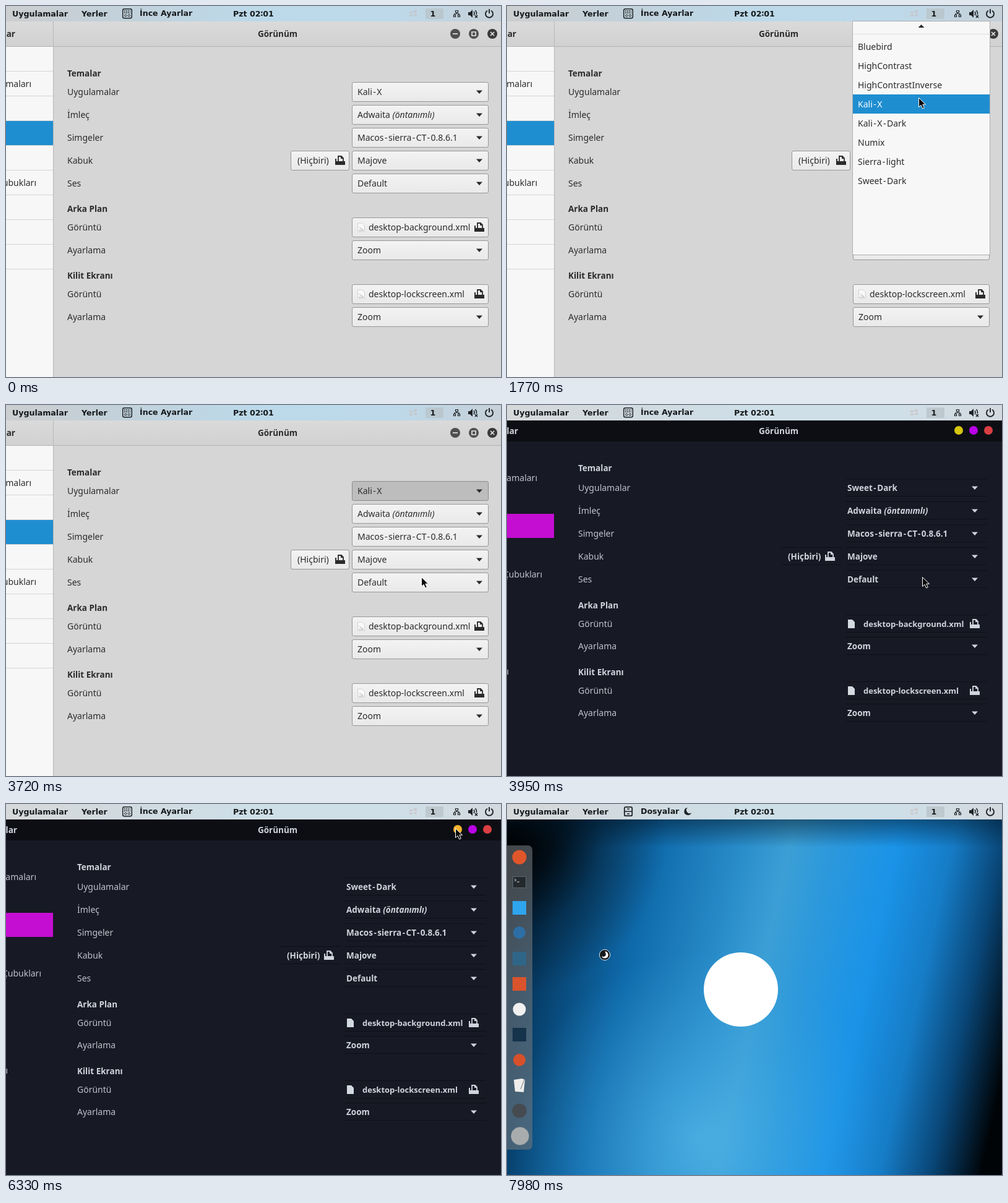
Recreate the animation shown at these times as an HTML page. Size 800 by 600 pixels, loop 8000 ms.

```html
<!DOCTYPE html>
<html lang="tr">
<head>
<meta charset="utf-8">
<title>Görünüm</title>
<style>
  html, body { margin: 0; width: 100%; height: 100%; overflow: hidden; background: #d6d6d6; }
  svg { display: block; font: 14px "Noto Sans", "Open Sans", sans-serif; }
  .bold { font-size: 13.5px; font-weight: 700; }
  .semi { font-size: 13.5px; font-weight: 600; }
  .name { font-size: 13px; font-weight: 600; }
  .bar { font: 700 12.6px "DejaVu Sans", sans-serif; fill: #161a1c; }
  .end { text-anchor: end; }
  .mid { text-anchor: middle; }
  .light { fill: #2b2b2b; color: #2b2b2b; }
  .dark { fill: #c0c3cc; color: #d0d4dc; }
  .dark .bold, .dark .semi, .dark .name { fill: #d0d4dc; }
  .combo rect { fill: url(#button); stroke: #979797; }
  .combo.hover rect { fill: #f7f7f7; }
  .combo.pressed rect { fill: #bdbdbd; stroke: #8c8c8c; }
  .item.on rect { fill: #1f8ed0; }
  .item.on text { fill: #fff; }
</style>
</head>
<body>
<svg id="stage" width="800" height="600" viewBox="0 0 800 600">
  <defs>
    <linearGradient id="button" x2="0" y2="1"><stop stop-color="#f3f3f3"/><stop offset="1" stop-color="#e9e9e9"/></linearGradient>
    <linearGradient id="header" x2="0" y2="1"><stop stop-color="#dadada"/><stop offset="1" stop-color="#d1d1d1"/></linearGradient>
    <linearGradient id="panel">
      <stop stop-color="#cccecf"/><stop offset=".22" stop-color="#c2d1da"/><stop offset=".5" stop-color="#bcd9e9"/>
      <stop offset=".78" stop-color="#bdd9ea"/><stop offset="1" stop-color="#c6d0d8"/>
    </linearGradient>
    <linearGradient id="sky" gradientUnits="userSpaceOnUse" x2="865" y2="190">
      <stop offset=".03" stop-color="#031c33"/><stop offset=".14" stop-color="#07426f"/><stop offset=".28" stop-color="#0f6aab"/>
      <stop offset=".44" stop-color="#2a8ecb"/><stop offset=".52" stop-color="#3c9fd5"/><stop offset=".6" stop-color="#2b98dc"/>
      <stop offset=".71" stop-color="#1a93e8"/><stop offset=".81" stop-color="#167cc6"/><stop offset=".9" stop-color="#094677"/><stop offset=".99" stop-color="#000407"/>
    </linearGradient>
    <radialGradient id="corner" gradientUnits="userSpaceOnUse" cx="0" cy="50" r="260">
      <stop stop-color="#000"/><stop offset=".3" stop-color="#000" stop-opacity=".72"/>
      <stop offset=".6" stop-color="#000" stop-opacity=".28"/><stop offset="1" stop-color="#000" stop-opacity="0"/>
    </radialGradient>
    <linearGradient id="ceiling" x2="0" y2="1"><stop stop-color="#001525" stop-opacity=".5"/><stop offset="1" stop-color="#001525" stop-opacity="0"/></linearGradient>
    <radialGradient id="glow" gradientUnits="userSpaceOnUse" cx="310" cy="540" r="300">
      <stop stop-color="#55b9ea" stop-opacity=".65"/><stop offset="1" stop-color="#3aa2dd" stop-opacity="0"/>
    </radialGradient>
    <g id="open" fill="currentColor">
      <path d="M5 9V1H10L13 4V9" fill="none" stroke="currentColor" stroke-width="1.8"/>
      <path d="M0 5H2V9H16V15H0ZM9 1V5H13Z"/>
    </g>
    <path id="file" d="M0 0H7L11 4V14H0Z"/>
    <path id="down" d="M-5-2.5H5L0 3Z" fill="currentColor"/>
  </defs>
  <g id="desktop"></g>
  <g id="light" class="light"></g>
  <g id="dark" class="dark"></g>
  <g id="panelBar"></g>
  <g id="popup" class="light"></g>
  <g id="cursor">
    <path id="arrow" d="M.5.5V15.5L4 12.3 6.7 18 9.3 16.8 6.8 11.2H11.5Z" fill="#0b0b0b" stroke="#fff"/>
    <g id="busy">
      <circle cx="9" cy="9" r="8.6" fill="#15191c" stroke="#dfe6ea"/>
      <path d="M9 3.5A5.5 5.5 0 1 1 4 11Q8 13 10 10.5T9 3.5" fill="#fff"/>
    </g>
  </g>
</svg>
<script>
const $ = id => document.getElementById(id);
const text = (x, y, s, cls = "") => `<text x="${x}" y="${y}" class="${cls}">${s}</text>`;
const rect = (x, y, w, h, fill, more = "") => `<rect x="${x}" y="${y}" width="${w}" height="${h}" fill="${fill}" ${more}/>`;
const disc = (x, y, r, fill, more = "") => `<circle cx="${x}" cy="${y}" r="${r}" fill="${fill}" ${more}/>`;
const use = (id, x, y, more = "") => `<use href="#${id}" x="${x}" y="${y}" ${more}/>`;
const path = (d, more) => `<path d="${d}" ${more}/>`;
// Theme names have a little air around their hyphens.
const airy = s => s.replace(/-(.)/g, '<tspan dx="1.5">-</tspan><tspan dx="1.5">$1</tspan>');

const slanted = 'Adwaita <tspan font-style="italic">(öntanımlı)</tspan>';
// label, value, light row centre, dark row centre
const rows = [
  ["Uygulamalar", "Kali-X", 139, 134], ["İmleç", slanted, 176, 171],
  ["Simgeler", "Macos-sierra-CT-0.8.6.1", 213, 208], ["Kabuk", "Majove", 250, 245], ["Ses", "Default", 287, 282],
  ["Görüntü", "desktop-background.xml", 358, 354], ["Ayarlama", "Zoom", 395, 390],
  ["Görüntü", "desktop-lockscreen.xml", 466, 462], ["Ayarlama", "Zoom", 503, 498]
];
const isFile = value => value.endsWith(".xml");
const label = value => value === slanted ? value : airy(value);

function lightRow([name, value, y]) {
  const body = isFile(value)
    ? use("file", 568.5, y - 7, 'fill="#f8f8f8" stroke="#d2d2d2"') + path(`M570 ${y + 5}h8m-7-5l6 4`, 'stroke="#a9adb0" fill="none"') +
      text(586, y + 5, value) + use("open", 757, y - 8)
    : text(568, y + 5, label(value)) + use("down", 765, y);
  return text(99, y + 5, name) +
    `<g class="combo" data-y="${y}">${rect(559.5, y - 15.5, 220, 31, "", 'rx="2.5"')}${body}</g>`;
}

function lightWindow() {
  const lines = Array.from({ length: 9 }, (_, i) => rect(0, 105 + 40 * i, 76, 1, "#d4d4d4")).join("");
  const glyphs = ["M-4 0H4", "M-3-3H3V3H-3Z", "M-3-3L3 3M3-3L-3 3"];
  const buttons = glyphs.map((d, i) => `<g transform="translate(${726 + 30 * i} 45)">` +
    disc(0, 0, 8, i < 2 ? "#505050" : "#3a3a3a") + path(d, 'fill="none" stroke="#e4e4e4" stroke-width="1.7"') + "</g>").join("");
  return rect(0, 25, 800, 575, "#d6d6d6") + rect(0, 66, 76, 534, "#f7f7f7") + lines +
    rect(0, 186, 76, 39, "#1f8ed0") + rect(0, 25, 800, 40, "url(#header)") +
    rect(0, 65, 800, 1, "#b4b4b4") + rect(76, 25, 1, 575, "#b7b7b7") +
    text(15, 50, "İnce Ayarlar", "bold end") + text(41, 131, "Başlangıç Uygulamaları", "end") +
    text(49, 291, "Pencere Başlık Çubukları", "end") + text(439, 50, "Görünüm", "bold mid") + buttons +
    text(99, 114, "Temalar", "bold") + text(99, 333, "Arka Plan", "bold") + text(99, 441, "Kilit Ekranı", "bold") +
    rows.map(lightRow).join("") +
    `<g class="combo">${rect(460.5, 234.5, 94, 31, "", 'rx="2.5"')}${text(471, 255, "(Hiçbiri)")}${use("open", 532, 242)}</g>`;
}

function darkRow([name, value, , y], i) {
  const shown = i ? value : "Sweet-Dark";
  const body = isFile(value)
    ? use("file", 551, y - 7, 'fill="#d3dae0"') + text(576, y + 5, value, "name") + use("open", 748, y - 8)
    : text(550, y + 5, label(shown), "semi") + use("down", 756, y);
  return text(115, y + 5, name) + rect(548, y - 15, 228, 1, "#0e0f17") + rect(548, y + 13, 228, 1, "#0e0f17") + body;
}

function darkWindow() {
  return rect(0, 25, 800, 575, "#171924") + rect(0, 25, 800, 34, "#0d0e14") + rect(0, 176, 76, 39, "#c40ed2") +
    text(18, 47, "İnce Ayarlar", "bold end") + text(49, 123, "Başlangıç Uygulamaları", "end") +
    text(57, 279, "Pencere Başlık Çubukları", "end") + text(3, 436, "Çalışma Alanları", "end") +
    text(439, 47, "Görünüm", "bold mid") +
    disc(730, 41, 7, "#d6c60f", 'id="minimise"') + disc(754, 41, 7, "#b900e8") + disc(778, 41, 7, "#d93f43") +
    text(115, 107, "Temalar", "bold") + text(115, 329, "Arka Plan", "bold") + text(115, 437, "Kilit Ekranı", "bold") +
    rows.map(darkRow).join("") +
    rect(443, 230, 97, 1, "#0e0f17") + rect(443, 258, 97, 1, "#0e0f17") +
    text(454, 250, "(Hiçbiri)", "semi") + use("open", 514, 237);
}

function popupMenu() {
  const names = ["Bluebird", "HighContrast", "HighContrastInverse", "Kali-X", "Kali-X-Dark", "Numix", "Sierra-light", "Sweet-Dark"];
  const item = (name, i) => `<g class="item">${rect(559, 50 + 31 * i, 221, 31, "none")}${text(567, 71 + 31 * i, airy(name))}</g>`;
  return rect(558.5, 24.5, 222, 378, "#f7f7f7", 'stroke="#aeaeae"') + rect(559, 45, 221, 1, "#dedede") +
    path("M664.5 35L669.5 30L674.5 35Z", "") + names.map(item).join("");
}

function desktop() {
  const square = (y, fill) => rect(9, y - 11, 22, 22, fill);
  const layers = ["sky", "glow", "corner"].map(id => rect(0, 0, 800, 600, `url(#${id})`)).join("");
  return layers + rect(0, 25, 800, 45, "url(#ceiling)") +
    disc(378, 300, 60, "#fff") +
    rect(-8, 67, 49, 492, "#70777c", 'rx="7" fill-opacity=".6"') +
    disc(20, 86, 11.5, "#e0562b") +
    rect(9.5, 117.5, 21, 18, "#23292d", 'stroke="#59656c"') + path("M12 121l3 2-3 2M16 126h4", 'fill="none" stroke="#d5dadd"') +
    square(168, "#2fa5ee") + disc(20, 208, 10, "#2d6fa5") + square(250, "#2f6688") + square(291, "#d9532c") +
    disc(20, 332, 10.5, "#f1f1f1") + square(373, "#15334b") + disc(20, 414, 10, "#d8502a") +
    path("M11 446L24 444 29 446 27 466 13 465Z", 'fill="#ededeb"') + path("M28 446L22 461", 'stroke="#777"') +
    disc(20, 496, 11.5, "#454b50") + disc(21, 537, 14.5, "#a9acad");
}

function panel() {
  const ink = 'fill="none" stroke="#1d2225" stroke-width="1.5"';
  return rect(0, 0, 800, 25, "url(#panel)") + rect(0, 0, 800, 25, "#e2e4e5", 'id="haze" opacity=".45"') +
    text(10, 17, "Uygulamalar", "bar") + text(122, 17, "Yerler", "bar") + text(367, 17, "Pzt 02∶01", "bar") +
    `<g id="tweaks">${rect(188.7, 4.7, 14.6, 15, "none", 'rx="2.5" stroke="#1d2225" stroke-width="1.5"')}` +
    path("M191 8h10m-10 3h10", 'stroke="#1d2225" stroke-width="1.6" stroke-dasharray="2 1"') +
    disc(193.3, 15.5, 1.7, "none", 'stroke="#1d2225"') + disc(198.8, 15.5, 1.7, "none", 'stroke="#1d2225"') +
    text(216, 16, "İnce Ayarlar", "bar") + "</g>" +
    `<g id="files">${rect(189.8, 4.8, 12.4, 14.4, "none", 'rx="2" stroke="#1d2225" stroke-width="1.8"')}` +
    path("M190 12h12m-8-4h4m-4 8h4", ink) + text(216, 16, "Dosyalar", "bar") +
    path("M292 6A6 6 0 1 0 298 14Q294 17 291 13T292 6", 'fill="#1d2225"') + "</g>" +
    path("M652 9h5v3h-5zm7-2h5v4h-5zm-7 7h5v3h-5zm7-1h5v3h-5z", 'fill="#c6bcba" opacity=".6"') +
    rect(678, 4, 29, 17, "#b9c3c9", 'opacity=".75"') + text(690, 17, "1", "bar mid") +
    path("M726.5 7.5h4v3h-4zM723.5 14.5h3v3h-3zM730.5 14.5h3v3h-3zM728.5 11v2M725 14v-1.5h7v1.5", 'fill="none" stroke="#1d2225" stroke-width="1.2"') +
    path("M747 10h3l4-4v13l-4-4h-3z", 'fill="#1d2225"') + path("M756 9q2 3 0 6M758.5 7q3 4 1.5 7M758 15l4 4m0-4l-4 4", ink) +
    path("M778 7.5A6 6 0 1 0 784 7.5M781 5v7", 'fill="none" stroke="#1d2225" stroke-width="1.9"');
}

$("light").innerHTML = lightWindow();
$("dark").innerHTML = darkWindow();
$("popup").innerHTML = popupMenu();
$("desktop").innerHTML = desktop();
$("panelBar").innerHTML = panel();

// Pointer strokes: start, end, number of steps, waypoints after the previous end.
const strokes = [
  [230, 990, 11, [[724, 512], [712, 400], [698, 290], [690, 207]]],
  [1070, 1770, 10, [[678, 172], [668, 142], [667, 140], [666, 145], [665, 148]]],
  [2400, 2710, 5, [[672, 288]]],
  [2880, 3490, 9, [[714, 285], [614, 287], [671, 278]]],
  [4260, 5020, 11, [[655, 240], [620, 180], [570, 130], [490, 106], [400, 125], [310, 175], [250, 235], [223, 280], [236, 308], [274, 317], [396, 308]]],
  [5090, 5860, 11, [[410, 290], [450, 250], [520, 186], [600, 125], [670, 75], [715, 45], [726, 39]]],
  [6730, 7520, 11, [[690, 41], [560, 65], [380, 105], [190, 145], [60, 168], [16, 171]]],
  [7590, 7980, 6, [[20, 174], [80, 205], [149, 235]]]
];

function along(points, f) {
  const s = f * (points.length - 1), i = Math.min(Math.floor(s), points.length - 2), u = s - i;
  return points[i].map((v, axis) => v + (points[i + 1][axis] - v) * u);
}

function pointerAt(t) {
  let at = [705, 549];
  for (const [start, end, count, points] of strokes) {
    if (t < start) break;
    const gap = (end - start) / (count - 1);
    const step = Math.min(count, Math.floor((t - start + 5) / gap) + 1);
    at = along([at, ...points], step / count);
  }
  return at.map(Math.round);
}

const show = (id, on) => { $(id).style.display = on ? "" : "none"; };
const combos = [...document.querySelectorAll(".combo[data-y]")];
const items = [...document.querySelectorAll(".item")];

function draw(t) {
  const [x, y] = pointerAt(t);
  const menu = t >= 1460 && t < 3720;
  const onDesktop = t >= 6420, launching = t >= 7670;
  show("light", t < 3950);
  show("dark", t >= 3950 && !onDesktop);
  show("popup", menu);
  show("desktop", onDesktop);
  show("haze", t >= 3950);
  show("tweaks", !onDesktop);
  show("files", launching);
  show("cursor", t >= 230);
  show("arrow", !launching);
  show("busy", launching);
  $("popup").setAttribute("opacity", t < 1540 || t >= 3640 ? 0.6 : 1);
  $("cursor").setAttribute("transform", `translate(${x} ${y})`);
  $("minimise").setAttribute("fill", t >= 5860 ? "#fab52f" : "#d6c60f");
  combos.forEach((combo, i) => {
    combo.classList.toggle("hover", t >= 230 && t < 1460 && Math.abs(y - combo.dataset.y) <= 16);
    combo.classList.toggle("pressed", i === 0 && t >= 1460);
  });
  items.forEach((item, i) => item.classList.toggle("on", Math.floor((y - 50) / 31) === i || (i === 3 && y < 143)));
}

const begin = performance.now();
function tick() {
  draw((performance.now() - begin) % 8000);
  requestAnimationFrame(tick);
}
tick();
</script>
</body>
</html>
```
